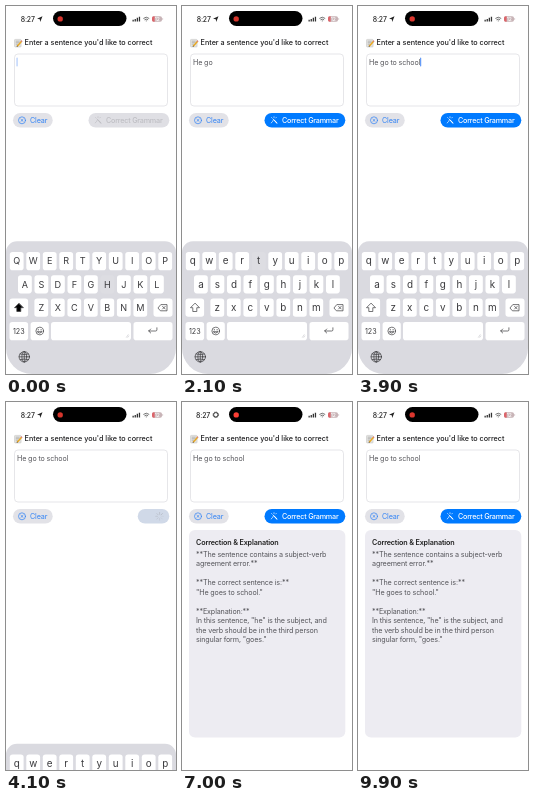
An HTML page for the animation above (10 s loop, 170 by 368 pixels).

```html
<!DOCTYPE html>
<html lang="en">
<head>
<meta charset="utf-8">
<title>Grammar correction</title>
<style>
html, body { margin: 0; width: 100%; height: 100%; overflow: hidden; background: #fff; }
svg { display: block; width: 100vw; height: 100vh; }
text { font: 7.2px Inter, Roboto, sans-serif; letter-spacing: -.02em; white-space: pre; }
.mid { text-anchor: middle; letter-spacing: 0; }
.line { fill: none; stroke: currentColor; stroke-width: .7; stroke-linecap: round; stroke-linejoin: round; }
#board { color: #3a3a3d; }
#board text { fill: #3a3a3d; }
#keys text { font-size: 9.1px; }
#keys.low text { font-size: 9.9px; }
#body text { fill: #55555a; }
</style>
</head>
<body>
<svg id="stage" viewBox="0 0 170 368">
  <!-- status bar -->
  <text id="clock" y="15.5" fill="#222" style="font-size:6.9px;font-weight:500">8:27</text>
  <path id="arrow" d="M36.5 10.3 31 12.8 33.8 13.3 34.2 16Z" fill="#222"/>
  <g id="ring" fill="none" stroke="#222">
    <circle cx="33.8" cy="12.8" r="2.2" stroke-width=".9"/>
    <circle cx="33.8" cy="12.8" r="2.8" stroke-width=".6" stroke-dasharray="1.5 .7"/>
  </g>
  <rect x="47" y="5" width="73.5" height="15" rx="7.5"/>
  <circle id="dot" cx="54.2" cy="12.9" r="2.7" fill="#ff3f35"/>
  <path d="M126.5 13.7h1.3v1.8h-1.3zM128.6 12.9h1.3v2.6h-1.3zM130.7 11.8h1.3v3.7h-1.3zM132.8 10.7h1.3v4.8h-1.3z" fill="#333"/>
  <path class="line" d="M137.7 12.2q2.6-2.2 5.2 0M138.8 13.6q1.5-1.2 3 0M140.2 14.9h.2" color="#333"/>
  <rect x="146" y="10.2" width="10" height="5.5" rx="1.8" fill="#c8b4b7"/>
  <path d="M148.6 10.2h-.8a1.8 1.8 0 0 0-1.8 1.8v1.9a1.8 1.8 0 0 0 1.8 1.8h.8z" fill="#dd646a"/>
  <rect x="156.4" y="12" width=".7" height="1.9" rx=".35" fill="#c8b4b7"/>
  <text class="mid" x="151.2" y="14.7" fill="#fff" style="font-size:4.8px;font-weight:600">12</text>

  <!-- heading and field -->
  <rect x="8.5" y="33.4" width="6.6" height="7.6" rx=".7" fill="#e4e4e2" stroke="#b4b4b0" stroke-width=".4"/>
  <path d="M9.7 35.2h4M9.7 36.7h4M9.7 38.2h2.5" stroke="#8b8b8b" stroke-width=".5"/>
  <path d="M11.2 40.2 15.4 35.4" stroke="#e9a821" stroke-width="1.5"/>
  <path d="M10.6 40.9 11 39.6 11.9 40.3Z" fill="#333"/>
  <path d="M15.2 35.6 16 34.7" stroke="#d7685f" stroke-width="1.5"/>
  <text x="18.6" y="39.4" fill="#1c1c1e" style="font-weight:500;letter-spacing:0">Enter a sentence you'd like to correct</text>
  <rect x="8.5" y="48" width="153" height="52" rx="3.5" fill="#fff" stroke="#d6d6da" stroke-width=".6"/>
  <text id="field" x="11" y="58.7" fill="#55555a"></text>
  <rect id="caret" y="51.5" width=".9" height="9" rx=".4" fill="#2f78f5"/>

  <!-- buttons -->
  <rect x="7" y="107" width="39.7" height="14.5" rx="7.25" fill="#e2e2e7"/>
  <g color="#2f82f5">
    <circle class="line" cx="16" cy="114.3" r="3.5"/>
    <path class="line" d="m14.9 113.2 2.2 2.2m0-2.2-2.2 2.2"/>
    <text x="24" y="116.9" fill="currentColor">Clear</text>
  </g>
  <rect id="pill" y="107" height="14.5" rx="7.25"/>
  <g id="label">
    <path class="line" d="m91.3 113.2 3.6 3.8M89.2 117q1.6-1 2.4-3.4M89.6 111.6l.6.6M92 110.8v.7M94.3 111.4l-.6.6"/>
    <path class="line" style="stroke-width:1.1" d="m92.5 114.5 2.3 2.5"/>
    <text x="100" y="116.9" fill="currentColor" style="font-weight:500;letter-spacing:-.03em">Correct Grammar</text>
  </g>
  <g id="spinner" stroke="#96969b" stroke-width=".9" stroke-linecap="round"></g>

  <!-- answer -->
  <g id="panel">
    <rect x="7" y="128" width="156.3" height="207.5" rx="6" fill="#edecf2"/>
    <text x="14" y="142.6" fill="#222" style="font-weight:600">Correction &amp; Explanation</text>
    <g id="body"></g>
  </g>

  <!-- keyboard -->
  <g id="board">
    <path d="M0 246.3a11 11 0 0 1 11-11h148a11 11 0 0 1 11 11V342a26 26 0 0 1-26 26H26a26 26 0 0 1-26-26z" fill="#dadae0"/>
    <g id="keys"></g>
    <path id="shift" class="line" d="M12.8 297.4 8.5 301.7h2.3v3.8h4v-3.8h2.3z"/>
    <g class="line">
      <path d="M152.2 301.7l2.6-3.1h6.2v6.2h-6.2zM156.6 300.4l2.6 2.6m0-2.6-2.6 2.6"/>
      <circle cx="33.7" cy="325" r="3.8"/>
      <path d="M32.3 323.4v.6M35.1 323.4v.6M31.5 326q2.2 2.6 4.4 0z"/>
      <path d="M150.9 321.8v2q0 1.2-1.2 1.2h-7m2-2-2 2 2 2"/>
      <circle cx="18.3" cy="350.8" r="5.2"/>
      <ellipse cx="18.3" cy="350.8" rx="2.4" ry="5.2"/>
      <path d="M18.3 345.6v10.4M13.1 350.8h10.4M14.1 348q4.2 1.2 8.4 0M14.1 353.6q4.2-1.2 8.4 0"/>
      <path d="M120.4 331.3l1.8-2.6m-.4 2.6 1-1.4" stroke="#b9b9be" style="stroke-width:.5"/>
    </g>
    <text class="mid" x="12.8" y="327.5">123</text>
  </g>
</svg>
<script>
const $ = id => document.getElementById(id);
const clamp = v => Math.max(0, Math.min(1, v));
const easeOut = p => 1 - (1 - clamp(p)) ** 3;
const mix = (a, b, k) => a + (b - a) * k;
const mixColor = (a, b, k) => `rgb(${a.map((v, i) => mix(v, b[i], k))})`;

function add(parent, tag, attrs, content = '') {
  const el = document.createElementNS('http://www.w3.org/2000/svg', tag);
  for (const name in attrs) el.setAttribute(name, attrs[name]);
  el.textContent = content;
  return parent.appendChild(el);
}

const LOOP = 10000, HOLD = 120, SEND = 3997, REPLY = 6500;
const SENTENCE = 'He go to school';
const presses = [-20, 250, 470, 700, 930, 1280, 2050, 2250, 2450, 2600, 2750, 2900, 3050, 3370, 3780];
const BLUE = [0, 122, 255], GRAY = [225, 225, 230];

const answer = `**The sentence contains a subject-verb
agreement error.**

**The correct sentence is:**
"He goes to school."

**Explanation:**
In this sentence, "he" is the subject, and
the verb should be in the third person
singular form, "goes."`;
answer.split('\n').forEach((s, i) => add($('body'), 'text', { x: 14, y: 154.7 + 9.5 * i }, s));

const keys = {}, letters = [];
const addKey = (x, y, width) =>
  add($('keys'), 'rect', { x, y, width, height: 18.2, rx: 2.8 });
[['qwertyuiop', 10.7, 246], ['asdfghjkl', 18.9, 269.2], ['zxcvbnm', 35.3, 292.6]].forEach(([row, x0, y]) =>
  [...row].forEach((c, i) => {
    const x = x0 + 16.5 * i;
    keys[c] = addKey(x - 6.9, y, 13.8);
    letters.push([c, add($('keys'), 'text', { class: 'mid', x, y: y + 12.3 })]);
  }));
keys[' '] = addKey(45, 316, 80);
[[3.5, 292.6, 18.6], [147.5, 292.6, 19], [3.5, 316, 18.6], [24.6, 316, 18.2], [127.5, 316, 39]]
  .forEach(k => keys[k] = addKey(...k));

const spokes = Array.from({ length: 8 }, (_, i) => add($('spinner'), 'path',
  { d: 'M153.6 112.3v-1.9', transform: `rotate(${45 * i} 153.6 114.3)` }));

function drawTyping(t) {
  const count = presses.filter(p => t >= p + HOLD).length;
  const last = count ? presses[count - 1] + HOLD : -500;
  $('field').textContent = SENTENCE.slice(0, count);
  $('caret').setAttribute('x', 11 + (count ? $('field').getComputedTextLength() : -.4));
  $('caret').style.opacity = t < SEND ? clamp((600 - (t - last) % 1100) / 200) : 0;

  const down = presses.findIndex(p => t >= p && t < p + HOLD);
  const held = down < 0 ? null : SENTENCE[down].toLowerCase();
  for (const c in keys) keys[c].setAttribute('fill', c === held ? '#dddde2' : '#fff');
  letters.forEach(([c, el]) => el.textContent = count ? c : c.toUpperCase());
  $('keys').setAttribute('class', count ? 'low' : '');
  $('shift').style.fill = count ? 'none' : '#000';
  return count > 0;
}

function drawButton(t, active) {
  const k = t < REPLY ? easeOut((t - SEND) / 250) : 1 - easeOut((t - REPLY) / 300);
  const x = mix(82.5, 144, k);
  $('pill').setAttribute('x', x);
  $('pill').setAttribute('width', 163.3 - x);
  $('pill').setAttribute('fill', active ? mixColor(BLUE, GRAY, k ** .35) : '#dfdfe4');
  $('label').style.color = active ? '#fff' : '#bebec3';
  $('label').style.opacity = clamp(1 - 2 * k);
  $('spinner').style.opacity = clamp(k * 3 - 2);
  const step = Math.floor(t / 100);
  spokes.forEach((s, i) => s.style.opacity = 1 - .1 * ((step - i + 800) % 8));
}

function draw(t) {
  const focus = t >= 5200 && t < 8800;
  $('clock').setAttribute('x', focus ? 14 : 14.7);
  $('arrow').style.display = focus ? 'none' : '';
  $('ring').style.display = focus ? '' : 'none';
  $('dot').style.opacity = .92 + .08 * Math.cos((t - 7150) * Math.PI / 1000);
  drawButton(t, drawTyping(t));
  $('panel').style.opacity = clamp((t - REPLY) / 300);
  $('board').setAttribute('transform', `translate(0 ${133 * easeOut((t - SEND) / 250)})`);
}

const start = performance.now();
function tick() {
  draw((performance.now() - start) % LOOP);
  requestAnimationFrame(tick);
}
tick();
</script>
</body>
</html>
```
